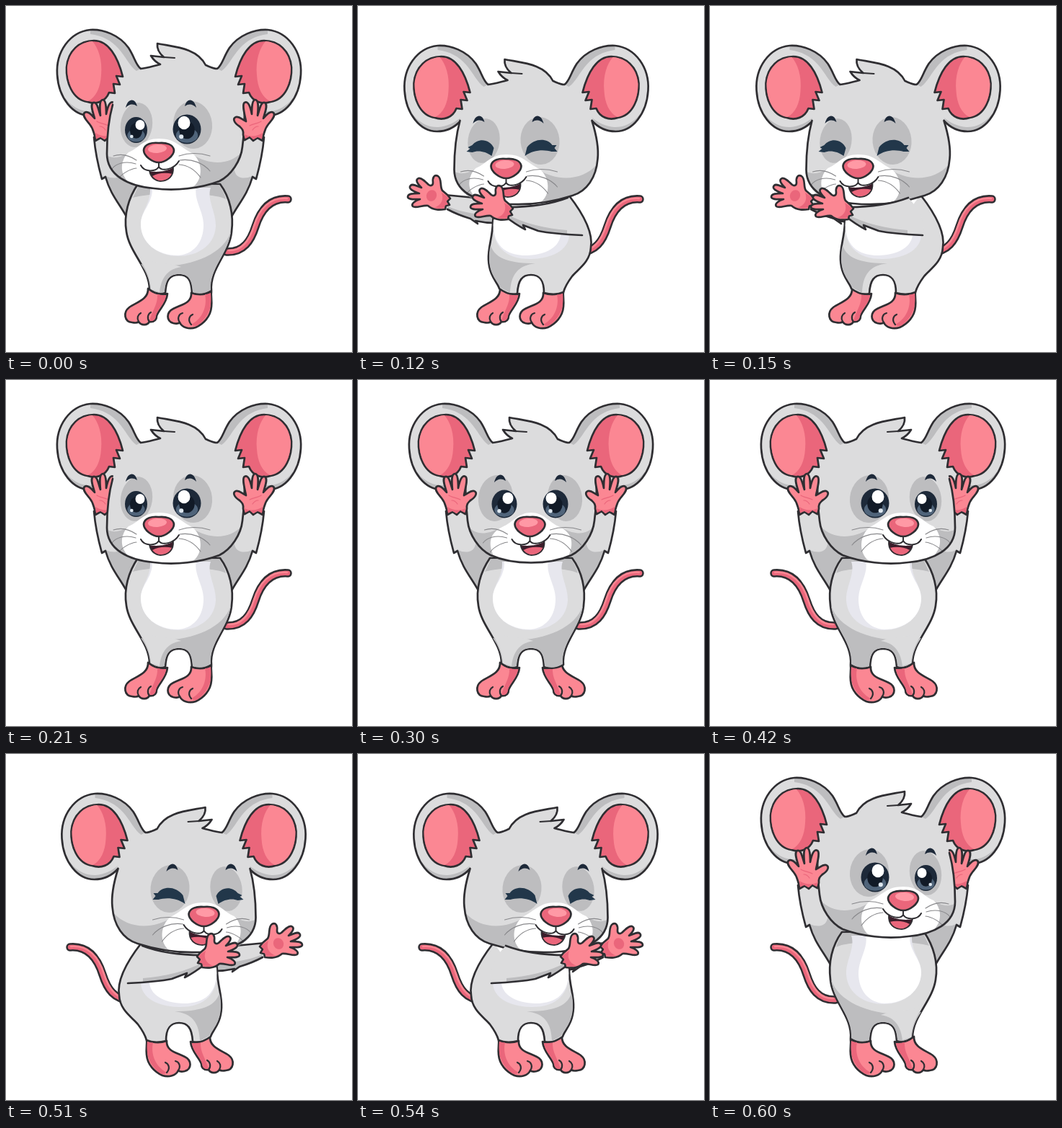
Write an HTML page that moves like this. It is 480 px wide and 480 px high and loops after 720 ms.

```html
<!DOCTYPE html>
<html lang="en">
<head>
<meta charset="utf-8">
<title>Clapping mouse</title>
<style>
html, body { margin: 0; width: 100%; height: 100%; overflow: hidden; background: #fff; }
svg { display: block; width: 100vw; height: 100vh; }
</style>
</head>
<body>
<svg id="stage" viewBox="0 0 480 480" stroke-linecap="round" stroke-linejoin="round"></svg>
<script>
const INK = '#2f2e32', FUR = '#dcdcdd', SHADE = '#bdbdbf', WHITE = '#fff';
const PINK = '#fb8793', ROSE = '#ea667b', NAVY = '#1d2939';

const fill = (d, color) => `<path d="${d}" fill="${color}"/>`;
const line = (d, width = 2.7, color = INK) =>
  `<path d="${d}" fill="none" stroke="${color}" stroke-width="${width}"/>`;
const shape = (d, color) => fill(d, color) + line(d);
const oval = (x, y, rx, ry, color, turn = 0) =>
  `<ellipse cx="${x}" cy="${y}" rx="${rx}" ry="${ry}" fill="${color}" transform="rotate(${turn} ${x} ${y})"/>`;
const group = (transform, content) => `<g transform="${transform}">${content}</g>`;
const shift = (x, y, content) => group(`translate(${x} ${y})`, content);
const mirror = content => group('translate(480 0) scale(-1 1)', content);

// Tail and feet
const tailPath = 'M306 341C330 342 340 325 346 306C353 284 366 266 391 268';
const tail = line(tailPath, 11.5) + line(tailPath, 6.4, ROSE) +
  line('M309 339C328 340 338 324 344 305C351 283 365 265 390 267', 2.5, PINK);

const footA = shape('M197 392C198 407 181 411 171 418C162 425 164 438 175 439C180 440 182 440 184 438C188 444 196 443 199 438C207 439 209 434 209 430C212 421 223 413 224 399C215 402 205 398 197 392Z', PINK) +
  fill('M210 399C215 402 220 401 222 401C221 413 210 420 208 430C207 437 203 437 199 437C203 422 211 414 210 399Z', ROSE) +
  line('M184 438C181 433 183 428 187 426M199 438C195 433 197 427 201 425', 2.2);

const footB = shape('M257 398C258 412 244 414 232 420C222 425 222 437 232 440C236 441 239 441 241 439C244 446 254 449 263 446C274 441 284 431 285 417C286 408 284 402 285 396C276 401 266 401 257 398Z', PINK) +
  fill('M276 400C279 400 281 399 284 398C285 410 286 428 266 443C262 445 260 444 257 442C275 432 279 414 276 400Z', ROSE) +
  line('M241 439C237 433 240 427 245 426M257 442C252 436 254 430 259 428', 2.2);

// Hands: raised with spread fingers, and stretched out to the left
const hand = shape('M329 179C330 172 327 170 324 167C316 162 314 156 319 154C324 153 328 158 333 160C331 150 327 136 331 134C336 131 339 140 341 150C341 142 341 130 346 130C351 131 350 142 349 152C352 143 354 132 359 134C364 137 359 148 357 156C362 150 367 145 371 148C375 152 368 159 364 164C359 170 359 174 357 180L356 187L349 183L343 187L338 182L331 186Z', PINK) +
  fill('M331 178C340 183 350 180 356 176L355 184L349 182L343 185L338 181L332 184Z', ROSE) +
  line('M338 166C343 163 350 163 354 160M342 172C344 169 347 167 350 167', 1.2, ROSE);
const palm = shape('M117 256C113 250 117 240 111 236C106 233 103 238 104 245C104 249 101 250 98 248C93 243 88 238 84 239C79 241 82 246 88 252C82 250 76 246 73 249C69 253 76 257 85 260C77 260 69 260 69 265C70 269 78 268 86 268C80 270 73 274 76 278C80 281 90 276 97 277C105 284 114 283 121 282L122 277L127 276L124 271L128 267L124 262Z', PINK) +
  fill('M116 259L122 263L126 267L122 271L125 275L120 277L120 280C115 281 110 281 106 280C117 275 119 268 116 259Z', ROSE);
const palmCrease = oval(102, 263, 7, 8, ROSE, 25);

const raisedArm =
  fill('M122 182C124 205 128 222 133 240L138 237C145 262 158 275 168 295L194 270L186 243C165 232 155 205 153 180Z', FUR) +
  fill('M138 236C148 261 158 273 168 293L192 268L186 243C176 238 168 228 163 217C166 238 154 242 138 236Z', SHADE) +
  line('M122 182C124 205 128 222 133 240L138 237C145 262 158 275 168 294');

// Bodies
const raisedBody =
  shape('M183 247C170 266 163 290 167 313C171 342 199 364 199 393C206 399 214 400 221 398C222 380 227 373 240 373C253 373 257 380 258 398C266 401 277 400 285 395C282 365 310 344 313 313C316 290 311 266 297 247Z', FUR) +
  fill('M184 249H296C300 254 303 260 305 268C288 258 202 258 176 266Z', SHADE) +
  fill('M312 313C300 350 240 368 187 358C195 369 199 380 200 392C207 397 213 399 220 397C221 378 228 372 240 372C252 372 258 378 259 397C267 400 277 399 284 394C282 364 308 344 312 313Z', SHADE) +
  fill('M180 340C200 362 215 352 243 362C222 365 215 380 213 397L201 393C200 372 190 360 180 340Z', FUR) +
  fill('M200 252H284C278 268 292 287 291 306C289 334 264 347 239 347C210 347 187 328 187 303C187 284 201 275 200 252Z', '#e7e7ee') +
  fill('M203 252H264C260 268 274 285 274 304C274 328 260 345 238 346C209 346 187 328 187 303C187 284 204 274 203 252Z', WHITE);

const leaningBody =
  shape('M292 262C310 285 327 312 323 335C322 356 304 366 297 375C291 383 287 390 285 397C276 401 266 400 258 398C258 380 252 373 240 373C228 373 222 380 221 399C213 401 204 398 196 392C194 384 182 375 181 352C180 335 187 320 187 300L190 270Z', FUR) +
  fill('M184 332C190 352 214 357 246 357C222 360 212 372 211 398L198 391C194 382 183 374 182 352C182 345 182 338 184 332Z', SHADE) +
  fill('M188 298C184 335 208 352 240 351C275 350 294 335 293 315L275 285L291 263L200 268Z', '#e7e7ee') +
  fill('M188 298C186 333 206 347 236 346C268 344 282 330 281 314L275 285L291 263L200 268Z', WHITE);

// Head
const earRim = 'M187 87C180 82 179 72 170 58C157 40 135 32 117 33C88 36 69 64 71 95C73 128 93 152 116 152C130 152 141 146 149 137';
const ear =
  fill(`${earRim}L185 125Z`, FUR) +
  fill('M72 103C76 128 95 147 118 146C130 145 140 140 149 133C140 148 128 152 116 152C93 152 74 128 72 103Z', SHADE) +
  fill('M117 33C135 32 157 40 170 58C179 72 180 82 187 87L181 90C172 84 166 70 156 59C146 48 134 41 117 39Z', SHADE) +
  line(earRim) +
  shape('M122 48C142 48 155 70 162 98L153 97L158 109L149 108L151 121L143 120C138 133 125 137 113 133C92 130 83 105 84 85C86 62 102 48 122 48Z', ROSE) +
  fill('M120 49C128 58 134 75 132 96C131 113 125 126 114 132C93 129 85 105 85 86C87 64 102 50 120 49Z', PINK);
const ears = ear + mirror(ear);

const crown = 'M187 87C196 86 205 83 214 81C208 78 204 74 201 69L219 71C213 66 209 60 210 52C235 57 265 58 277 82C282 84 287 87 293 87';
const leftJaw = 'C170 250 140 235 140 205C140 180 143 155 148 137';
const sideJaw = 'C331 150 330 180 328 195C326 215 312 235 296 243C270 253 235 257 205 253' + leftJaw;
const laughJaw = 'C336 153 341 172 339 190C337 216 324 235 304 241C270 252 235 255 205 252' + leftJaw;
const frontJaw = 'C331 150 330 180 328 195C326 215 312 235 296 243C265 257 215 257 184 243C168 235 154 215 152 195C150 175 149 155 149 137';

const eye = (x, y, rx, ry, gx, gy, gr) =>
  oval(x, y, rx, ry, NAVY) + oval(x, y + ry * .42, rx * .78, ry * .5, '#50647a') +
  oval(x, y + 1, rx * .55, ry * .6, '#111a27') +
  oval(gx, gy, gr, gr * 1.08, WHITE) + oval(x - rx * .4, y + ry * .5, gr * .36, gr * .36, '#dfe8f0');
const brow = (x, y, dir) =>
  fill(`M${x - 8 * dir} ${y + 6}C${x - 5 * dir} ${y - 7} ${x + 5 * dir} ${y - 8} ${x + 8 * dir} ${y + 4}C${x + 2 * dir} ${y} ${x - 3 * dir} ${y + 1} ${x - 8 * dir} ${y + 6}Z`, NAVY);

const snout =
  line('M181 214C168 205 158 205 149 208M180 219C165 214 152 219 147 226M181 225C172 226 160 233 157 239M240 208C255 203 270 204 283 208M241 214C258 211 275 219 283 229M240 220C255 221 265 231 270 238', 1.1, '#88888b') +
  fill('M199 229C208 231 222 230 232 224C233 238 224 244 214 243C206 242 201 236 199 229Z', '#3b1d2a') +
  fill('M203 236C212 231 222 231 231 233C227 245 211 246 203 236Z', ROSE) +
  line('M199 229C201 239 209 244 216 243C225 242 233 236 232 224', 1.7) +
  line('M187 221C192 231 208 230 212 223C216 230 233 227 240 215M212 217V223', 2) +
  shape('M191 200C192 191 203 189 212 190C222 189 232 192 233 200C233 208 221 217 212 217C203 217 191 208 191 200Z', ROSE) +
  oval(210, 198, 13, 6, '#ff99a5', -4);

const sideFace = eyes =>
  oval(181, 165, 22, 31, SHADE, 8) + oval(259, 165, 27, 33, SHADE, -6) +
  fill('M141 208C150 212 158 210 168 205C158 222 163 238 172 247C152 241 141 228 141 208Z', SHADE) +
  fill('M212 184C235 184 240 195 258 204C273 215 274 240 260 250C235 255 200 254 172 246C155 232 160 212 170 203C185 197 190 184 212 184Z', WHITE) +
  eyes + brow(174, 135, 1) + brow(256, 135, -1) + snout;

const openEyes = eye(180.5, 172, 15.5, 18, 186, 165, 6.5) + eye(251, 171, 19.5, 20.5, 247, 162, 8.5);
const shutEyes =
  fill('M157 180L162 176L159 174L165 171C173 161 189 162 195 175L192 186C183 179 172 178 165 181Z', '#22374a') +
  fill('M238 186L241 174C251 161 269 161 276 171L282 171L279 175L283 180L275 180C265 177 250 177 238 186Z', '#22374a');

const cheek = fill('M327 203C310 220 285 222 258 206C272 222 270 245 260 251C285 249 305 241 315 228C322 220 325 212 327 203Z', SHADE);
const wideCheek = fill('M338 198C318 220 285 222 258 206C272 222 270 245 260 250C285 248 300 242 306 239C325 232 334 216 338 198Z', SHADE);

const frontFace =
  oval(191, 164, 24, 32, SHADE, 6) + oval(287, 164, 24, 32, SHADE, -6) +
  fill('M327 203C318 214 304 216 284 206C298 215 299 228 293 243C311 236 324 219 327 203Z', SHADE) +
  fill('M153 203C162 214 176 216 196 206C182 215 181 228 187 243C169 236 156 219 153 203Z', SHADE) +
  fill('M240 184C258 184 264 197 280 204C296 212 300 225 292 243C265 254 215 254 188 243C180 225 184 212 200 204C216 197 222 184 240 184Z', WHITE) +
  eye(203, 172, 17.5, 19.5, 208, 164, 7.5) + eye(274, 172, 17.5, 19.5, 268, 164, 7.5) +
  brow(197, 136, 1) + brow(281, 136, -1) + shift(26.5, 0, snout);

const head = (jaw, face) =>
  fill(`${crown}C315 100 327 120 331 137${jaw}C152 120 165 100 187 87Z`, FUR) + face +
  line(crown) + line('M219 71L234 72', 2) + line('M331 137' + jaw);

// Poses, all turned to the left
const arms = raisedArm + mirror(raisedArm);
const cheerSide = tail + footA + footB + arms + raisedBody + ears +
  mirror(hand) + head(sideJaw, cheek + sideFace(openEyes)) + hand;
const cheerFront = tail + footA + mirror(footA) + arms + raisedBody + ears +
  head(frontJaw, frontFace) + mirror(hand) + hand;

const farArm =
  fill('M120 262L160 265L195 275V300C182 301 172 300 163 298L166 302L156 295C146 292 135 288 124 282Z', FUR) +
  fill('M124 278C145 287 170 290 195 290V300C182 301 172 300 163 298L166 302L156 295C146 292 135 288 124 282Z', SHADE) +
  line('M120 262L162 266M190 301C180 301 172 300 163 298L166 302L156 295C146 292 135 288 124 282') +
  palm + palmCrease;
const nearArm =
  fill('M208 279C235 279 265 276 291 266C305 280 316 300 311 318C290 317 265 315 250 312L229 304L232 310C220 304 212 298 203 291Z', FUR) +
  fill('M205 288C230 302 262 309 290 311L290 317C275 316 262 314 250 312L229 304L232 310C220 304 212 298 203 291Z', SHADE) +
  line('M208 279C235 279 265 276 291 266M311 318C290 317 265 315 250 312L229 304L232 310C220 304 212 298 203 291') +
  shift(87, 14, palm);
const clap = reach => tail + footA + footB + shift(reach, 0, farArm) + leaningBody +
  shift(-6.5, 22, ears + head(laughJaw, wideCheek + sideFace(shutEyes))) + shift(-reach, 0, nearArm);

const timeline = [
  [0, cheerSide], [120, clap(0)], [150, clap(16)], [210, cheerSide], [300, cheerFront],
  [360, mirror(cheerFront)], [420, mirror(cheerSide)], [510, mirror(clap(0))],
  [540, mirror(clap(16))], [600, mirror(cheerSide)]
];

const stage = document.getElementById('stage');
let shown;
function draw() {
  const time = performance.now() % 720;
  const pose = timeline.findLast(([start]) => start <= time)[1];
  if (pose !== shown) stage.innerHTML = shown = pose;
  requestAnimationFrame(draw);
}
draw();
</script>
</body>
</html>
```
